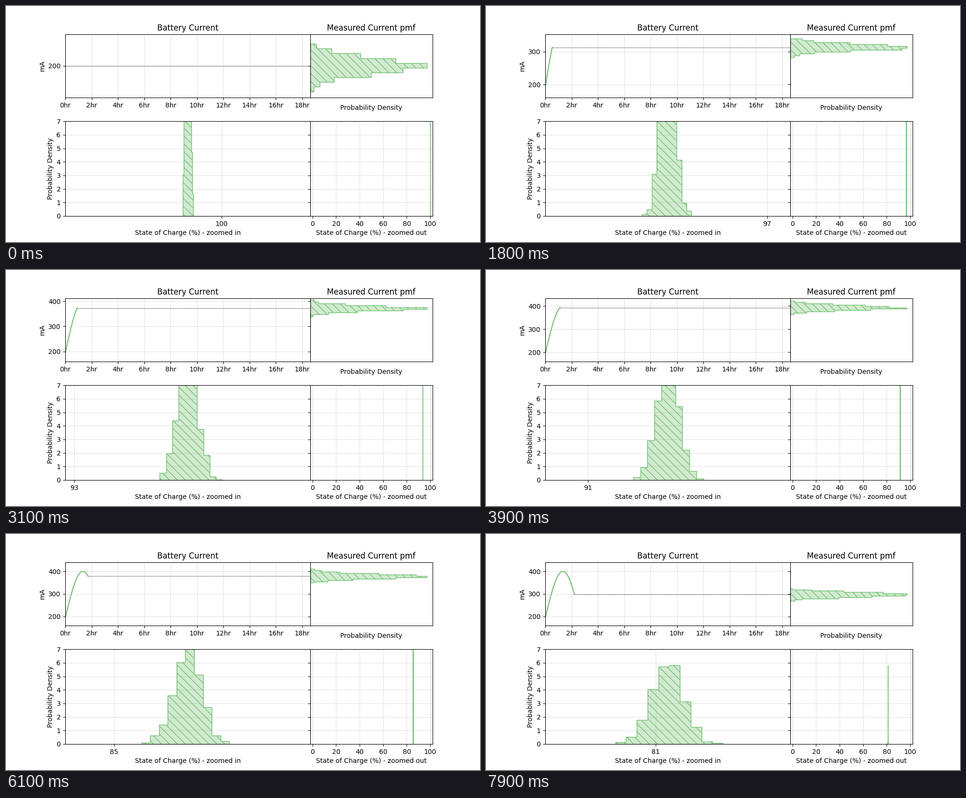
These frames come from a looping animation (1000x500 px, 8000 ms). A matplotlib script:

```python
import numpy as np
import matplotlib.pyplot as plt
from matplotlib.animation import FuncAnimation
from matplotlib.patches import Polygon
from matplotlib.ticker import MultipleLocator

STEPS = 80
INTERVAL = 100        # ms per step
DT = 100 / 3600       # simulated hours per step
CAPACITY = 4000       # mAh
NOISE = 10            # mA, std of the current sensor
SAMPLES = 1000
BINS = 10
GREEN, PALE = "#6dbf6e", "#d2ead0"

# A noisy sinusoidal load drains a cloud of battery states
steps = np.arange(STEPS)
hours = (steps + 1) * DT
current = 200 + 200 * np.sin(steps / 30)
noise = np.random.default_rng(4).normal(0, NOISE, (STEPS, SAMPLES))
readings = current[:, None] + noise


def remaining(amps):
    return 100 - np.cumsum(amps, axis=0) * DT / CAPACITY * 100


charge = remaining(current)
particles = remaining(readings)


def outline(sample):
    heights, edges = np.histogram(sample, BINS, density=True)
    up = np.concatenate([[0], np.repeat(heights, 2), [0]])
    return np.column_stack([np.repeat(edges, 2), up])


def add_hist(ax):
    patch = Polygon([(0, 0), (0, 1), (1, 1)], facecolor=PALE, edgecolor=GREEN,
                    hatch="\\\\", linewidth=1)
    ax.add_patch(patch)
    return patch


fig, ((ax_cur, ax_pmf), (ax_in, ax_out)) = plt.subplots(
    2, 2, figsize=(10, 5), dpi=100, sharey="row",
    gridspec_kw=dict(width_ratios=[2, 1], height_ratios=[2, 3],
                     left=0.125, right=0.9, bottom=0.11, top=0.88,
                     wspace=0, hspace=0.3))

ax_cur.set_title("Battery Current")
ax_cur.set_ylabel("mA")
ax_cur.set_xlim(0, 18.6)
ax_cur.xaxis.set_major_locator(MultipleLocator(2))
ax_cur.xaxis.set_major_formatter("{x:.0f}hr")
ax_cur.yaxis.set_major_locator(MultipleLocator(100))

ax_pmf.set_title("Measured Current pmf")
ax_pmf.set_xlabel("Probability Density", labelpad=11)
ax_pmf.set_xticks([])

ax_in.set_xlabel("State of Charge (%) - zoomed in")
ax_in.set_ylabel("Probability Density")
ax_in.set_ylim(0, 7)
ax_in.yaxis.set_major_locator(MultipleLocator(1))
ax_in.xaxis.set_major_locator(MultipleLocator(1))
ax_in.xaxis.set_major_formatter("{x:.0f}")

ax_out.set_xlabel("State of Charge (%) - zoomed out")
ax_out.set_xlim(-2, 102)
ax_out.xaxis.set_major_locator(MultipleLocator(20))

for ax in (ax_cur, ax_in, ax_out):
    ax.grid(alpha=0.35)

trace, = ax_cur.plot([], [], color=GREEN, linewidth=1.5)
level, = ax_cur.plot([], [], color="black", linestyle="--", linewidth=0.5)
pmf, zoom_in, zoom_out = map(add_hist, (ax_pmf, ax_in, ax_out))


def update(i):
    trace.set_data(hours[:i + 1], current[:i + 1])
    level.set_data([hours[i], 18.6], [current[i]] * 2)
    ax_cur.set_ylim(160, current[:i + 1].max() + 40)

    shape = outline(readings[i])
    pmf.set_xy(shape[:, ::-1])
    ax_pmf.set_xlim(0, shape[:, 1].max() * 1.05)

    shape = outline(particles[i])
    zoom_in.set_xy(shape)
    zoom_out.set_xy(shape)
    ax_in.set_xlim(charge[i] - 0.5, charge[i] + 0.5)
    return trace, level, pmf, zoom_in, zoom_out


anim = FuncAnimation(fig, update, frames=STEPS, interval=INTERVAL,
                     init_func=lambda: update(0), repeat=True,
                     repeat_delay=0, blit=False)
plt.show()
```
